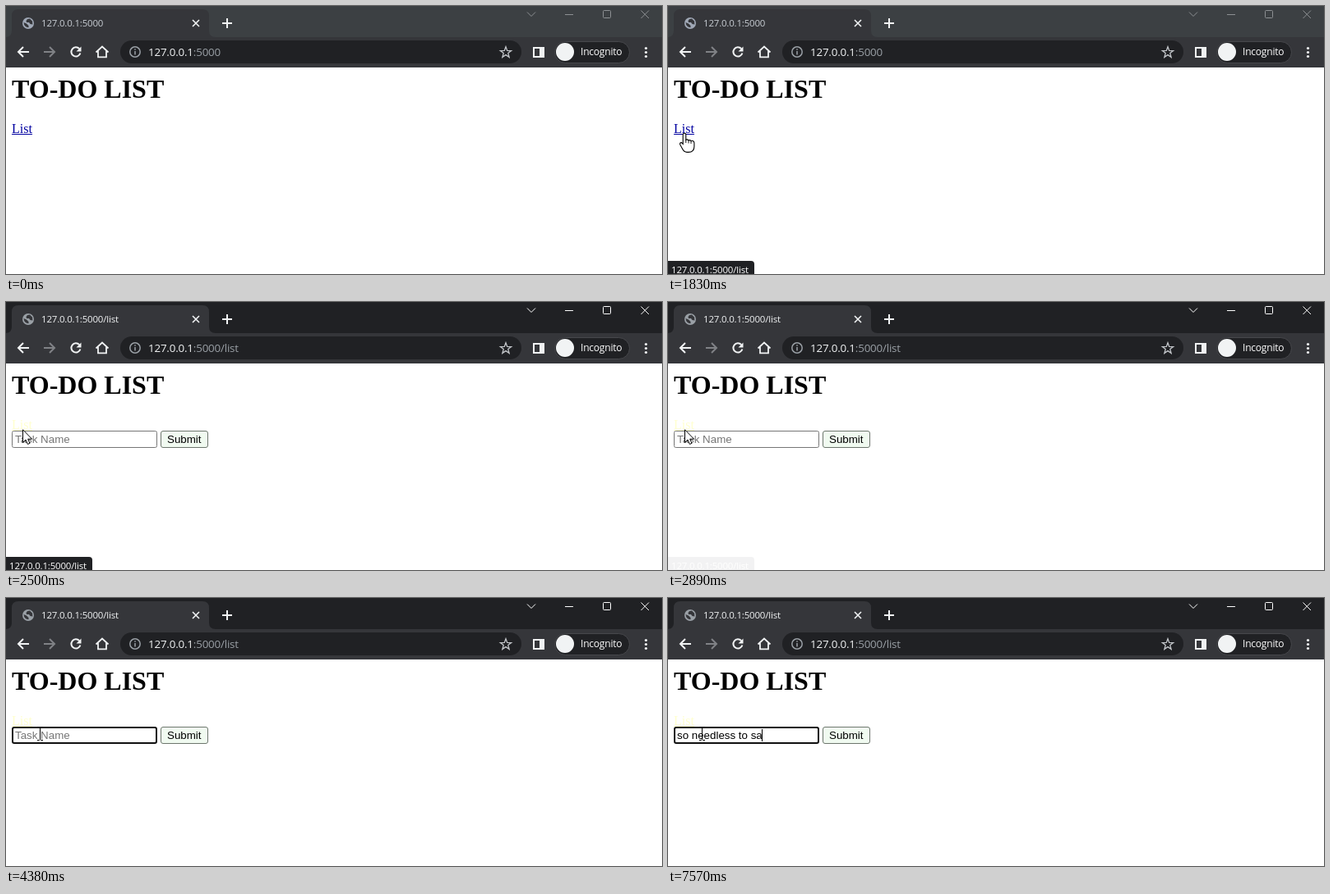
These frames come from a looping animation (798x327 px, 8 s). An HTML page:

```html
<!DOCTYPE html>
<html lang="en">
<head>
<meta charset="utf-8">
<title>To-do list</title>
<style>
  html, body { margin: 0; width: 100%; height: 100%; overflow: hidden; background: #fff; }
  svg { display: block; width: 798px; height: 327px; }
  text { white-space: pre; }
  .ui { font: 11.5px "Open Sans", "Noto Sans", sans-serif; letter-spacing: -.2px; }
  .url { font-size: 13.4px; }
  .serif { font-family: "Liberation Serif", "Times New Roman", serif; }
  .form { font: 13.333px "Liberation Sans", Arial, sans-serif; }
  .line { fill: none; stroke: #f1f3f4; stroke-width: 2; }
</style>
</head>
<body>
<svg viewBox="0 0 798 327" xmlns="http://www.w3.org/2000/svg">
  <rect width="798" height="327" fill="#fff"/>

  <!-- Window frame and tab -->
  <rect id="bar" width="798" height="38"/>
  <path d="M-1 38Q7 38 7 30V12Q7 4 15 4H239Q247 4 247 12V30Q247 38 255 38Z" fill="#35363a"/>
  <rect y="38" width="798" height="37" fill="#35363a"/>
  <circle id="globe" cx="27" cy="21" r="7"/>
  <path d="M21.5 20L25 21.5L27.5 24V26.3Q22 26 21.5 20ZM26 16L29 15.5L32 18.5L32.4 22.5L29.5 22L28 20H25L24.5 18Z" fill="#35363a"/>
  <text id="tab" class="ui" x="43" y="25"></text>
  <path class="line" style="stroke-width:1.6" d="M227 17L235 25M235 17L227 25"/>
  <path class="line" d="M263 21H275M269 15V27"/>
  <g id="controls" fill="none" stroke-width="1">
    <path d="M634 7.5L639 12.5L644 7.5M680 10.5H690M772.5 5.5L782 15M782 5.5L772.5 15"/>
    <rect x="726.5" y="5.5" width="9" height="9" rx="1"/>
  </g>

  <!-- Toolbar -->
  <path class="line" d="M28 56H15.5M21 50L15 56L21 62"/>
  <path class="line" style="stroke:#808286" d="M46 56H58.5M53 50L59 56L53 62"/>
  <path class="line" d="M89.2 52.2A5.6 5.6 0 1 0 90.4 57.5"/>
  <path d="M91.5 49.5V55.5H85.5Z" fill="#f1f3f4"/>
  <path class="line" style="stroke-width:1.8" d="M109.5 56.5L117 49.5L124.5 56.5M112 55V62.3H122V55"/>
  <rect x="139" y="42" width="488" height="28" rx="14" fill="#202124"/>
  <g fill="none" stroke="#9aa0a6" stroke-width="1.5">
    <circle cx="157" cy="56" r="6.2"/>
    <path d="M157 55V59.5M157 52.2V53.7"/>
    <path id="star" stroke="#c4c7cb" stroke-width="1.3"/>
  </g>
  <text class="ui url" x="173" y="61" fill="#f1f3f4">127.0.0.1<tspan id="path" fill="#9aa0a6"></tspan></text>
  <rect class="line" x="642" y="51" width="12" height="11"/>
  <rect x="649" y="50" width="6" height="13" fill="#f1f3f4"/>
  <rect x="667.5" y="43.5" width="91" height="26" rx="13" fill="#202124" stroke="#47484c"/>
  <circle cx="680" cy="56" r="11" fill="#f1f3f4"/>
  <text class="ui" style="font-size:12px" x="699" y="60" fill="#fff">Incognito</text>
  <g fill="#f1f3f4">
    <circle cx="778.5" cy="51.5" r="1.6"/><circle cx="778.5" cy="56.5" r="1.6"/><circle cx="778.5" cy="61.5" r="1.6"/>
  </g>

  <!-- Page -->
  <text class="serif" x="7" y="112" font-size="32" font-weight="700">TO-DO LIST</text>
  <g id="link">
    <text class="serif" x="7" y="155" font-size="16">List</text>
    <rect x="7" y="156" width="25" height="1"/>
  </g>
  <g id="form" class="form">
    <rect id="field" fill="#fff"/>
    <text id="entry" x="11" y="172"></text>
    <rect id="caret" y="160" width="1" height="15"/>
    <rect x="188.5" y="157.5" width="57" height="20" rx="2.5" fill="#f0faf0" stroke="#6d766d"/>
    <text x="196" y="172">Submit</text>
  </g>
  <g id="status">
    <path d="M0 311H101Q105 311 105 315V327H0Z" fill="#202124"/>
    <text class="ui" x="4" y="325.5" fill="#fff">127.0.0.1:5000/list</text>
  </g>

  <!-- Pointer -->
  <circle id="halo" r="12.5" fill="#ff0" opacity=".6"/>
  <g id="arrow"><path d="M.5 .8V16.4L4 13.1L6.4 18.5L9 17.4L6.7 12.2H11.6Z" fill="#fff" stroke="#000"/></g>
  <g id="hand"><path d="M-1.8 1.8Q-1.8 .2 0 .2T1.8 1.8V8.2Q3.4 7.2 5 8.9Q6.8 8 8 9.7Q11.4 8.8 11.9 12V16.5Q11.7 23.4 5 23.4H3Q-.6 23.2 -2.6 19L-5.4 13.9Q-5.8 11.5 -3.6 11.6L-1.8 13.4Z" fill="#fff" stroke="#000" stroke-width="1.1"/>
    <path d="M1.8 8V12M5 9V12.5M8 10V13" stroke="#000" stroke-width=".9"/></g>
  <g id="beam"><path d="M-3.5 -8H-1L0 -7L1 -8H3.5M0 -7V7M-3.5 8H-1L0 7L1 8H3.5" fill="none" stroke="#000"/></g>
</svg>
<script>
const LOOP = 8000;
const CLICK = 2290, LOADED = 2440, FOCUS = 3850;
const PHRASE = "so needless to sa";
const KEYS = [5260, 5390, 5520, 5650, 5850, 5980, 6180, 6380, 6510, 6710,
  6910, 6980, 7120, 7250, 7320, 7450, 7570];
const STATUS = [[0, 0], [1690, .3], [1760, .7], [1830, 1], [2760, .7], [2830, .35], [2890, .05], [3030, 0]];

const el = {};
document.querySelectorAll("[id]").forEach(node => el[node.id] = node);
const pen = document.createElement("canvas").getContext("2d");
pen.font = '13.333px "Liberation Sans", Arial, sans-serif';

const set = (node, attrs) => { for (const k in attrs) node.setAttribute(k, attrs[k]); };
const show = (node, on) => set(node, { visibility: on ? "visible" : "hidden" });
const label = (node, s) => { if (node.textContent !== s) node.textContent = s; };
const at = (t, keys) => keys.reduce((value, [time, next]) => time <= t ? next : value, keys[0][1]);
const between = (t, a, b) => t >= a && t < b;

function starPath() {
  const points = Array.from({ length: 10 }, (_, i) => {
    const r = i % 2 ? 2.9 : 7, a = (i / 5 - .5) * Math.PI;
    return (608 + r * Math.cos(a)).toFixed(2) + " " + (56.7 + r * Math.sin(a)).toFixed(2);
  });
  return "M" + points.join("L") + "Z";
}

function pointer(t) {
  if (t < 460) return null;
  if (t < 860) return ["arrow", ...at(t, [[460, [606, 187]], [530, [430, 88]], [600, [284, 99]]])];
  if (t < 2500) {
    // Glide to the link, sampled every 70 ms.
    const step = Math.min(11, Math.floor((t - 860) / 70) + 1), rest = 1 - step / 11;
    const x = Math.round(20 + 264 * rest ** 1.87), y = Math.round(155 - 56 * rest ** 1.12);
    return [step < 9 ? "arrow" : "hand", x, y];
  }
  if (t < 3030) return ["arrow", 20, 155];
  if (t < 3110) return ["beam", 30.5, 161.5];
  const drift = Math.max(0, Math.min(4, Math.floor((t - 3310) / 70) + 1)) / 4;
  return ["beam", 39.5 + Math.round(2 * drift), 163.5 + Math.round(2 * drift)];
}

function update(t) {
  const active = t >= CLICK, loaded = t >= LOADED, focused = t >= FOCUS;
  const suffix = loaded ? "/list" : "";
  set(el.bar, { fill: active ? "#202124" : "#3c4043" });
  set(el.globe, { fill: active ? "#9aa0a6" : "#a0a8b6" });
  set(el.tab, { fill: active ? "#f1f3f4" : "#c8cdd3" });
  set(el.controls, { stroke: active ? "#fff" : "#8d9093" });
  label(el.tab, "127.0.0.1:5000" + suffix);
  label(el.path, ":5000" + suffix);

  set(el.link, { fill: loaded ? "#ffffce" : active ? "#f00000" : "#0000a0" });
  show(el.form, loaded);
  const line = focused ? 2 : 1;
  set(el.field, {
    x: 7 + line / 2, y: 157 + line / 2, width: 177 - line, height: 21 - line, rx: 2,
    "stroke-width": line, stroke: focused ? "#101010" : t >= 3030 ? "#4f4f4f" : "#767676"
  });

  const typed = PHRASE.slice(0, KEYS.filter(k => k <= t).length);
  label(el.entry, typed || "Task Name");
  set(el.entry, { fill: typed ? "#000" : "#757575" });
  set(el.caret, { x: Math.floor(11 + pen.measureText(typed).width) });
  show(el.caret, focused && !between(t, 4380, 4930));

  set(el.status, { opacity: at(t, STATUS) });

  const now = pointer(t);
  for (const kind of ["arrow", "hand", "beam"]) show(el[kind], now && now[0] === kind);
  if (now) {
    const [kind, x, y] = now;
    set(el[kind], { transform: `translate(${x} ${y})` });
    set(el.halo, { cx: x, cy: y });
  }
  show(el.halo, between(t, CLICK, LOADED) || between(t, FOCUS, 3980));
}

set(el.star, { d: starPath() });
const start = performance.now();
function tick() {
  update((performance.now() - start) % LOOP);
  requestAnimationFrame(tick);
}
tick();
</script>
</body>
</html>
```
